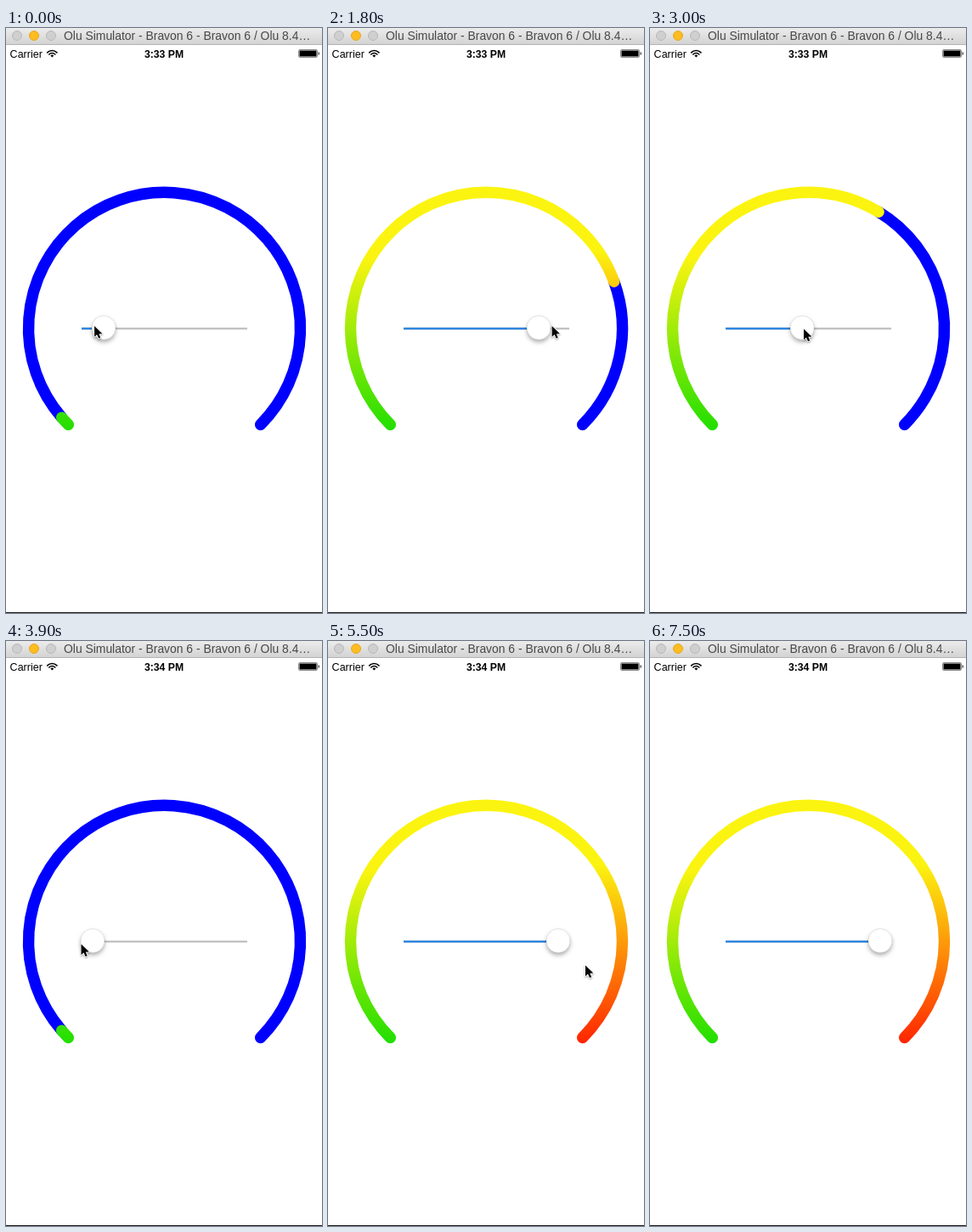
Animation, 372 px wide and 688 px high, one loop 7600 ms. Source, as an HTML page with a canvas:

```html
<!DOCTYPE html>
<html lang="en">
<head>
<meta charset="utf-8">
<title>Gauge with slider</title>
<style>
  html, body { margin: 0; width: 100%; height: 100%; overflow: hidden; background: #fff; }
  canvas { display: block; }
</style>
</head>
<body>
<canvas id="stage" width="372" height="688"></canvas>
<script>
const ctx = document.getElementById('stage').getContext('2d');
const LOOP = 7600, STEP = 100, LAG = 220, FLOOR = 0.015;
const CX = 186.5, CY = 353.3, R = 160, LINE = 13.4;
const START = Math.PI * 0.75, SWEEP = Math.PI * 1.5;
const FONT = '"Liberation Sans", Arial, sans-serif';

const ramp = (t, a, b) => Math.min(1, Math.max(0, (t - a) / (b - a)));
const ease = u => (1 - Math.cos(Math.PI * u)) / 2;

// drag right, drag back to zero, drag right again
function sliderValue(t) {
  const up = 0.077 + 0.923 * ease(ramp(t, 0, 2400));
  const down = 1 - ramp(t, 2245, 3635);
  return Math.max(Math.min(up, down), ease(ramp(t, 4000, 5200)));
}

// the gauge trails the slider and never empties completely
function gaugeValue(t) {
  return t < LAG ? FLOOR : Math.max(FLOOR, sliderValue(t - LAG));
}

const thumbX = value => 102 + 169 * value;

function pointerPos(t) {
  const value = sliderValue(t), drift = ramp(t, 4000, 5400);
  return [
    thumbX(value) - 13.5 + 33.5 * value + 12 * drift,
    350.5 + 6 * ramp(t, 1800, 3900) + 25 * drift - 400 * ramp(t, 5700, 6500)
  ];
}

function vertical(y0, c0, y1, c1) {
  const g = ctx.createLinearGradient(0, y0, 0, y1);
  g.addColorStop(0, c0);
  g.addColorStop(1, c1);
  return g;
}

const leftFill = vertical(270, '#fbf410', 472, '#22df00');
const rightFill = vertical(262, '#fbf410', 474, '#ff2400');
const barFill = vertical(0, '#ececec', 19, '#d3d3d3');

function rect(x, y, w, h, color) {
  ctx.fillStyle = color;
  ctx.fillRect(x, y, w, h);
}

function disc(x, y, r, fill, edge) {
  ctx.beginPath();
  ctx.arc(x, y, r, 0, Math.PI * 2);
  ctx.fillStyle = fill;
  ctx.fill();
  if (edge) {
    ctx.lineWidth = 1;
    ctx.strokeStyle = edge;
    ctx.stroke();
  }
}

function label(text, x, y, font, color) {
  ctx.font = font + ' ' + FONT;
  ctx.fillStyle = color;
  ctx.fillText(text, x, y);
}

function titleBar() {
  rect(0, 0, 372, 19, barFill);
  rect(0, 19, 372, 1, '#b4b4b4');
  ['#cfcfcf', '#fdbc20', '#cfcfcf'].forEach((color, i) =>
    disc(13 + 20 * i, 9, 5.5, color, i === 1 ? '#e6a823' : '#b8b8b8'));
  label('Olu Simulator - Bravon 6 - Bravon 6 / Olu 8.4…', 68, 14, '13.9px', '#484848');
}

function wifi(x, y) {
  const a0 = -Math.PI * 0.75, a1 = -Math.PI * 0.25;
  ctx.strokeStyle = ctx.fillStyle = '#000';
  ctx.lineWidth = 1.6;
  for (const r of [5, 8]) {
    ctx.beginPath();
    ctx.arc(x, y, r, a0, a1);
    ctx.stroke();
  }
  ctx.beginPath();
  ctx.moveTo(x, y);
  ctx.arc(x, y, 2.8, a0, a1);
  ctx.fill();
}

function battery(x, y) {
  ctx.beginPath();
  ctx.roundRect(x, y, 22, 9, 1.5);
  ctx.lineWidth = 1;
  ctx.strokeStyle = '#8a8a8a';
  ctx.stroke();
  rect(x + 1, y + 1, 20, 7, '#000');
  rect(x + 23, y + 3, 1.5, 3, '#555');
}

function statusBar(t) {
  label('Carrier', 4.6, 35, '12.5px', '#000');
  wifi(54.3, 34.5);
  label(t < 3500 ? '3:33 PM' : '3:34 PM', 163, 35, 'bold 12.2px', '#000');
  battery(344.5, 25.5);
}

function arc(from, to, style) {
  ctx.beginPath();
  ctx.arc(CX, CY, R, START + SWEEP * from, START + SWEEP * to);
  ctx.lineWidth = LINE;
  ctx.lineCap = 'round';
  ctx.strokeStyle = style;
  ctx.stroke();
}

function half(x, w, value, style) {
  ctx.save();
  ctx.beginPath();
  ctx.rect(x, 180, w, 310);
  ctx.clip();
  arc(0, value, style);
  ctx.restore();
}

function gauge(value) {
  if (value < 1) arc(value, 1, '#0000ff');
  half(0, 187, value, leftFill);
  if (value > 0.47) half(187, 185, value, rightFill);
}

function slider(value) {
  const x = thumbX(value);
  rect(89, 352.5, 195, 2, '#b7b7b7');
  rect(89, 352.5, x - 89, 2, '#1179e2');
  ctx.save();
  ctx.shadowColor = 'rgba(0,0,0,0.32)';
  ctx.shadowBlur = 5;
  ctx.shadowOffsetY = 3;
  disc(x, 352.5, 14, '#fff');
  ctx.restore();
  disc(x, 352.5, 14, '#fff', 'rgba(0,0,0,0.1)');
}

function pointer(x, y) {
  const pts = [[0, 0], [0, 14.5], [3.4, 11.4], [5.7, 16.6], [8.2, 15.5], [6, 10.5], [10.6, 10.3]];
  ctx.save();
  ctx.translate(x, y);
  ctx.scale(0.88, 0.88);
  ctx.beginPath();
  for (const [px, py] of pts) ctx.lineTo(px, py);
  ctx.closePath();
  ctx.lineJoin = 'round';
  ctx.lineWidth = 2;
  ctx.strokeStyle = '#fff';
  ctx.shadowColor = 'rgba(0,0,0,0.35)';
  ctx.shadowBlur = 2;
  ctx.shadowOffsetY = 1;
  ctx.stroke();
  ctx.shadowColor = 'transparent';
  ctx.fillStyle = '#000';
  ctx.fill();
  ctx.restore();
}

function draw(now) {
  const t = Math.floor((now % LOOP) / STEP) * STEP;
  rect(0, 0, 372, 688, '#fff');
  titleBar();
  statusBar(t);
  gauge(gaugeValue(t));
  slider(sliderValue(t));
  pointer(...pointerPos(t));
  rect(0, 687, 372, 1, '#1a1a1a');
}

const begin = performance.now();
function tick() {
  draw(performance.now() - begin);
  requestAnimationFrame(tick);
}
tick();
</script>
</body>
</html>
```
